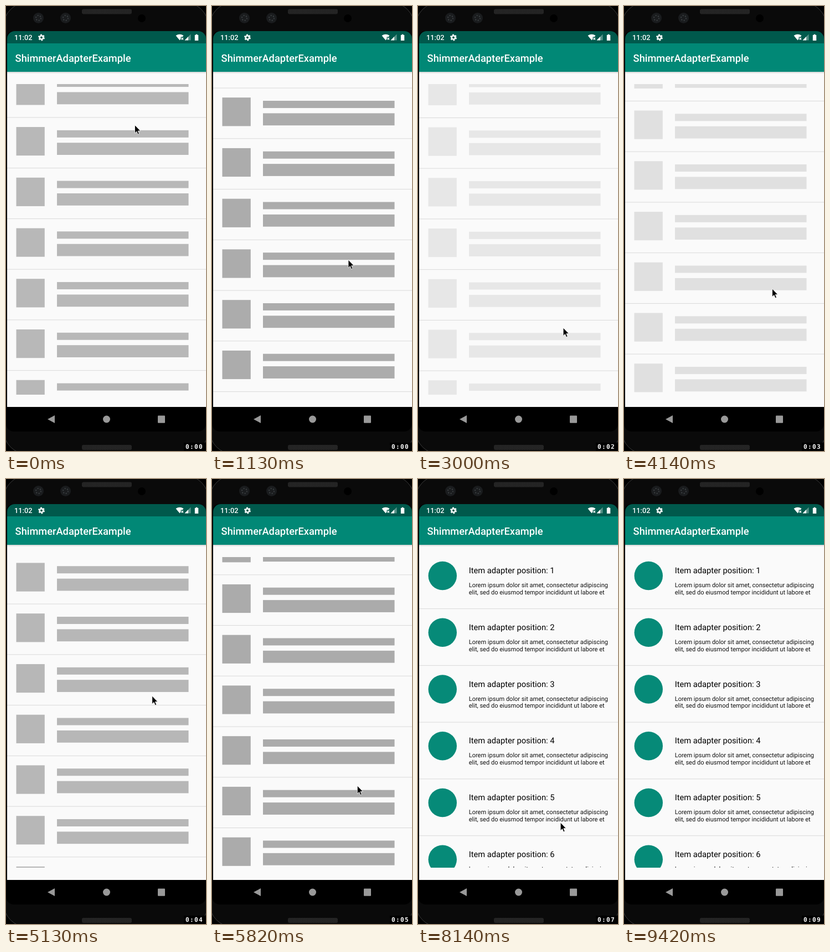
Animation, 361 px wide and 798 px high, one loop 9520 ms. Source, as an HTML page:

```html
<!DOCTYPE html>
<html lang="en">
<head>
<meta charset="utf-8">
<title>Shimmer list</title>
<style>
  html, body { margin: 0; width: 100%; height: 100%; overflow: hidden; background: #0a0a0a; }
  svg { display: block; width: 361px; height: 798px; }
  text { font-family: Roboto, sans-serif; text-rendering: geometricPrecision; }
  .light { fill: #fff; font-weight: 500; }
  .clock { font-size: 12.8px; }
  .title { font-size: 18.27px; }
  .name { font-size: 14.68px; fill: #000; }
  .body { font-size: 11.04px; fill: #111; }
  .timer { font: bold 11px "DejaVu Sans Mono", monospace; letter-spacing: 1.4px; fill: #fff; }
  .line { fill: #dadada; }
</style>
</head>
<body>
<svg viewBox="0 0 361 798">
  <defs>
    <clipPath id="listClip"><rect x="2" y="140" width="359" height="557"/></clipPath>
    <clipPath id="screenClip"><rect x="2" y="45" width="359" height="718" rx="14"/></clipPath>
    <linearGradient id="shadow" x2="0" y2="1">
      <stop stop-color="#000" stop-opacity=".16"/>
      <stop offset="1" stop-color="#000" stop-opacity="0"/>
    </linearGradient>
    <pattern id="mesh" width="3" height="3" patternUnits="userSpaceOnUse">
      <rect width="3" height="3" fill="#1c1c1c"/>
      <path d="M0 0L3 3M3 0L0 3" stroke="#333" stroke-width=".6"/>
    </pattern>
    <g id="lens">
      <circle r="9.5" fill="#1a1c1e"/>
      <circle r="4.5" fill="none" stroke="#3c4043" stroke-width="2" stroke-dasharray="2 2.7"/>
    </g>
  </defs>

  <!-- phone body -->
  <rect width="361" height="798" fill="#000"/>
  <rect x="-5" y="-7" width="371" height="811" rx="45" fill="#0a0a0a" stroke="#3a3a3a"/>
  <use href="#lens" x="58.5" y="21.5"/>
  <use href="#lens" x="107.5" y="21.5"/>
  <circle cx="245" cy="22" r="7" fill="#000"/>
  <rect x="137" y="5.5" width="90" height="9" rx="3" fill="url(#mesh)"/>
  <rect x="137" y="787" width="90" height="9" rx="3" fill="url(#mesh)"/>
  <rect y="45" width="361" height="718" rx="14" fill="#000"/>

  <!-- screen -->
  <rect x="2" y="118" width="359" height="601" fill="#fafafa"/>
  <g clip-path="url(#listClip)">
    <g id="bones"></g>
    <g id="items"></g>
    <path id="glow" fill="#008577"/>
  </g>
  <rect x="2" y="118" width="359" height="3.5" fill="url(#shadow)"/>
  <g clip-path="url(#screenClip)">
    <rect y="45" width="361" height="22" fill="#00594c"/>
    <rect y="67" width="361" height="51" fill="#018876"/>
  </g>
  <text class="light clock" x="15" y="61">11:02</text>
  <text class="light title" x="16.6" y="99.8">ShimmerAdapterExample</text>

  <!-- status icons -->
  <g fill="none" stroke="#fff">
    <circle cx="64" cy="56.5" r="3.2" stroke-width="2.4"/>
    <circle cx="64" cy="56.5" r="5" stroke-width="1.8" stroke-dasharray="2.9 2.336"/>
  </g>
  <g fill="#fff">
    <path d="M306.5 53Q313.5 48.5 320.5 53L318.5 55.500H315.500V59L313.500 61.500Z"/>
    <path d="M316.5 57l3.5 3.5m0-3.5l-3.5 3.5" stroke="#fff" stroke-width="1.2"/>
    <path d="M322.5 61.5L333.5 50.5V61.5Z" fill-opacity=".35"/>
    <path d="M322.5 61.5L329 55V61.5Z"/>
    <path d="M340.8 52h1.8v-1.3h2.8V52h1.8v10h-6.4z"/>
  </g>

  <!-- navigation bar -->
  <g fill="#999">
    <path d="M75 741L88 734V748Z"/>
    <circle cx="181.5" cy="741" r="6.5"/>
    <rect x="274" y="734.5" width="13" height="13.2" rx="1"/>
  </g>

  <path id="cursor" d="M0 0V14.500l3.300-3.100 2.300 5.300 2.300-1-2.200-5.200h4.500z" stroke="#fff" stroke-width=".8"/>
  <rect x="321" y="783" width="40" height="15" fill="#000"/>
  <text id="timer" class="timer" x="324" y="793.8"></text>
</svg>
<script>
const LOOP = 9520, LOADED = 7700, TICK = 141.5;
const el = id => document.getElementById(id);
const rect = (x, y, w, h, cls = '') =>
  `<rect class="${cls}" x="${x}" y="${y}" width="${w}" height="${h}"/>`;

// Stack n rows of the given pitch, each closed by a divider.
const rows = (n, top, pitch, row) => Array.from({ length: n }, (_, i) =>
  `<g transform="translate(0 ${top + i * pitch})">${row(i)}${rect(2, pitch - 0.6, 359, 1, 'line')}</g>`
).join('');

const PITCH = 90.75;
el('bones').innerHTML = rows(8, 139.75, PITCH, () =>
  rect(18.5, 17, 51.3, 51.2) + rect(92, 22.8, 237.5, 13) + rect(92, 45.2, 237.5, 21.8));

el('items').innerHTML = rows(6, 131, 101.75, i => `
  <circle cx="44.3" cy="42.5" r="25.7" fill="#068a78"/>
  <text class="name" x="91.7" y="38">Item adapter position: ${i + 1}</text>
  <text class="body" x="91.7" y="63">Lorem ipsum dolor sit amet, consectetur adipiscing</text>
  <text class="body" x="91.7" y="75.9">elit, sed do eiusmod tempor incididunt ut labore et</text>`);

// Turning points of the drag, in ticks.
const drag = [
  { at: 0, scroll: 393.5, x: 232.5, y: 213.5 },
  { at: 13, scroll: 0, x: 256.7, y: 647 },
  { at: 29, scroll: 60, x: 267.5, y: 507 },
  { at: 36, scroll: 187.8, x: 263.7, y: 389 },
  { at: 41, scroll: 58.6, x: 262.3, y: 550 },
  { at: 50, scroll: 9, x: 247.5, y: 668 },
  { at: 54, scroll: 9, x: 247.5, y: 668 },
  { at: 61, scroll: 9, x: 272, y: 536 },
  { at: 64, scroll: 9, x: 318, y: 770 }
];

function pose(n) {
  const i = drag.findIndex(p => p.at > n), a = drag[i - 1], b = drag[i];
  const u = (n - a.at) / (b.at - a.at), e = u * u * (3 - 2 * u);
  const mix = key => a[key] + (b[key] - a[key]) * e;
  return { scroll: mix('scroll'), x: mix('x'), y: mix('y') };
}

// Smooth hump from 0 to 1 and back between a and b.
const bump = (n, a, b) => n > a && n < b ? Math.sin(Math.PI * (n - a) / (b - a)) ** 2 : 0;

// Grey of the placeholders: a cosine pulse that lags a little mid-way.
function shade(n) {
  const phase = 0.1866 * Math.min(n, 50) - 0.974 - 0.5 * bump(n, 13, 48);
  return Math.round(202 - 32 * Math.cos(phase));
}

const show = (id, on) => { el(id).style.display = on ? '' : 'none'; };
const set = (id, attrs) => {
  for (const key in attrs) el(id).setAttribute(key, attrs[key]);
};

function draw(t) {
  const n = Math.floor(t / TICK), g = shade(n), pull = bump(n, 11, 15);
  const visible = n < drag.at(-1).at;
  show('bones', t < LOADED);
  show('items', t >= LOADED);
  show('cursor', visible);
  if (visible) {
    const { scroll, x, y } = pose(n);
    set('bones', { fill: `rgb(${g},${g},${g})`, transform: `translate(0 ${-(scroll % PITCH)})` });
    set('cursor', { transform: `translate(${x} ${y})` });
  }
  const edge = 140 + 6 * pull;
  set('glow', { d: `M2 140H361V${edge}Q181.5 ${140 + 28 * pull} 2 ${edge}Z`, opacity: 0.05 * pull });
  el('timer').textContent = '0:0' + Math.max(0, Math.floor((t - 250) / 1000));
}

const begin = performance.now();
function frame() {
  draw((performance.now() - begin) % LOOP);
  requestAnimationFrame(frame);
}
frame();
</script>
</body>
</html>
```
